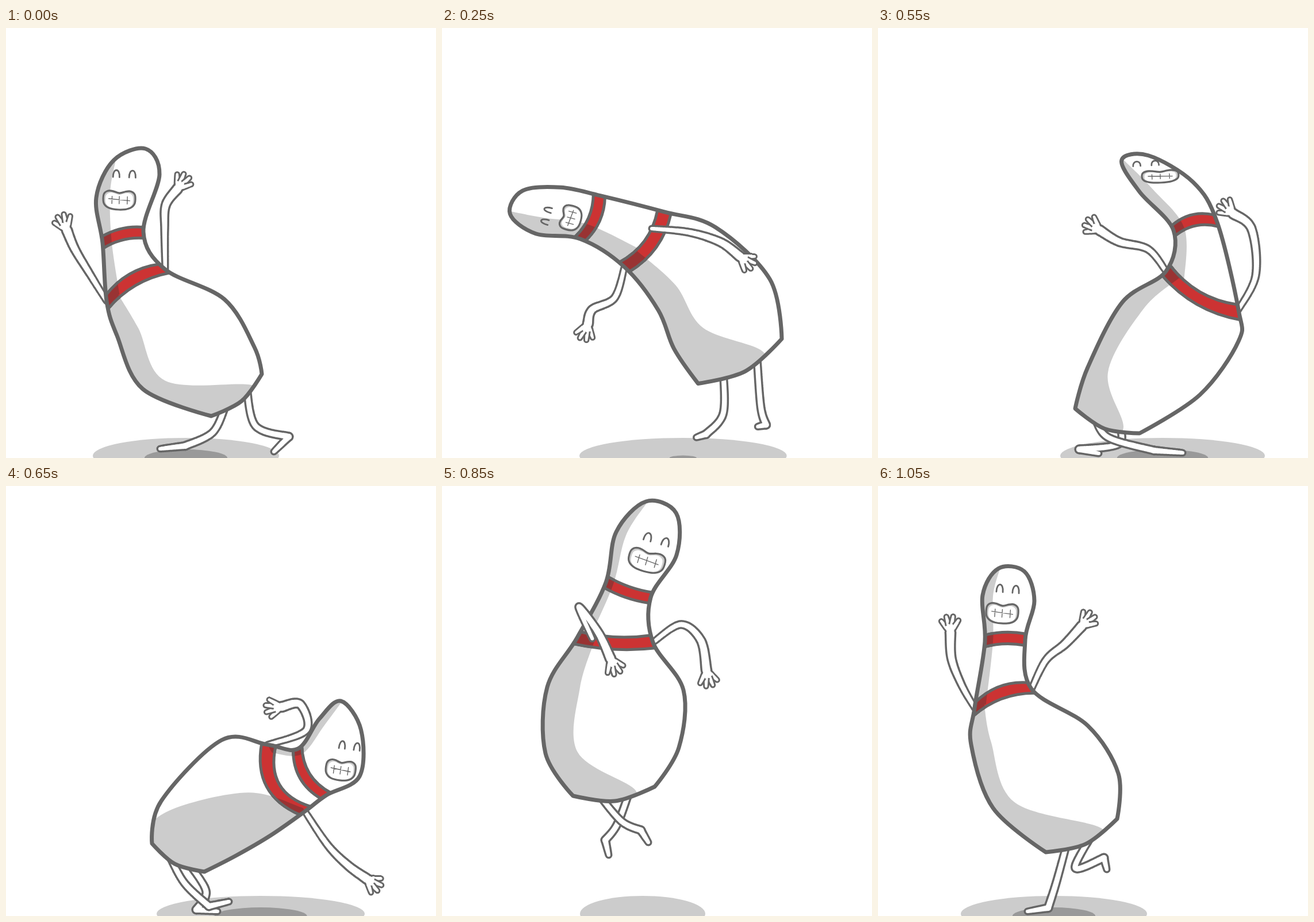
Write an HTML page with a canvas that moves like this. It is 748x748 px and loops after 1.1 s.

```html
<!DOCTYPE html>
<html lang="en">
<head>
<meta charset="utf-8">
<title>Dancing pin</title>
<style>
html, body { margin: 0; width: 100%; height: 100%; overflow: hidden; background: #fff; }
canvas { display: block; }
</style>
</head>
<body>
<canvas id="stage" width="748" height="748"></canvas>
<script>
const ctx = document.getElementById('stage').getContext('2d');
const LOOP = 1100, STEP = 50;
const LINE = '#666', GREY = '#ccc', DARK = '#999', RED = '#cc3333';
const LOW = 3, HIGH = 4; // ribs that carry the red bands

// ribs: left and right edge at base, two belly heights, low band, high band, head
// tip: top of the head; face: mouth and eyes; smile: half width, half height, angle
// bow: bend of the high and low band; dim: shade depth on head and belly, belly shift
// arms: two bends and wrist; legs: knee, ankle, toe
// inset: how far each shoulder sits in front; floor: centre, radius, contact
const poses = [
  { t: 0, ribs: [357,675,445,602, 238,628,432,555, 193,535,380,472, 175,475,277,420, 168,374,239,355, 157,295,267,255],
    tip: [215,220], face: [197,299, 206,253], smile: [28, 17, 0.03], bow: [6, 11], dim: [.22, .2, 0],
    armL: [146,428, 120,385, 106,352], armR: [276,350, 278,308, 298,280], inset: [0, 0],
    legA: [360,703, 312,727, 268,732], legB: [434,692, 492,711, 466,737], floor: [313, 162, 1] },
  { t: 150, ribs: [412,628,533,553, 372,582,505,445, 345,515,400,350, 279,455,321,349, 201,418,219,344, 125,427,150,337],
    tip: [82,381], face: [171,401, 130,401], smile: [20, 17, -1.45], bow: [-4, -12], dim: [.3, .28, 0],
    armL: [268,520, 245,560, 226,588], armR: [298,450, 285,510, 258,542], inset: [0, .3],
    legA: [443,680, 416,728, 385,731], legB: [499,670, 504,722, 477,738], floor: [357, 199, 1] },
  { t: 400, ribs: [446,615,617,590, 405,525,632,510, 386,430,590,420, 394,338,525,323, 370,245,454,212, 330,175,425,148],
    tip: [352,110], face: [401,176, 378,145], smile: [28, 18, -.38], bow: [-8, -8], dim: [.35, .28, 0],
    armL: [358,332, 337,293, 312,312], armR: [516,270, 538,225, 550,190], inset: [0, .15],
    legA: [508,668, 483,700, 492,725], legB: [567,665, 581,677, 584,650], floor: [505, 143, -.5] },
  { t: 550, ribs: [343,662,455,705, 365,590,560,638, 425,477,627,545, 501,423,627,490, 514,352,590,338, 455,285,548,268],
    tip: [447,226], face: [491,258, 466,235], smile: [32, 11, -.05], bow: [10, -14], dim: [.25, .18, 0],
    armL: [470,385, 420,372, 386,352], armR: [657,430, 650,350, 618,323], inset: [0, 0],
    legA: [400,712, 480,735, 530,739], legB: [418,724, 350,733, 384,740], floor: [495, 178, 1] },
  { t: 650, ribs: [254,622,345,671, 270,548,400,643, 375,442,460,608, 455,450,520,566, 508,457,557,538, 545,405,615,505],
    tip: [600,399], face: [582,494, 598,451], smile: [26, 18, .13], bow: [-14, -28], dim: [.12, 1.25, 1.2],
    armL: [522,425, 512,380, 480,384], armR: [560,625, 595,660, 627,683], inset: [0, 0],
    legA: [310,690, 353,731, 388,723], legB: [348,705, 331,737, 368,740], floor: [443, 181, 1] },
  { t: 850, ribs: [228,539,370,523, 180,465,412,455, 183,350,420,355, 235,264,367,272, 285,168,363,194, 303,80,408,120],
    tip: [381,37], face: [356,130, 374,92], smile: [32, 19, .28], bow: [-4, -6], dim: [.16, .24, 0],
    armL: [238,210, 272,255, 293,300], armR: [415,241, 450,268, 460,320], inset: [.2, 0],
    legA: [312,583, 346,599, 359,620], legB: [305,588, 284,616, 290,642], floor: [349, 109, -.5] },
  { t: 1050, ribs: [292,637,416,579, 200,560,418,500, 162,450,365,417, 168,386,267,353, 186,271,256,268, 182,190,272,200],
    tip: [232,146], face: [216,221, 226,178], smile: [28, 18, .07], bow: [4, 11], dim: [.2, .17, 0],
    armL: [145,345, 128,300, 126,255], armR: [292,303, 325,275, 354,244], inset: [0, 0],
    legA: [310,690, 296,734, 260,740], legB: [343,664, 393,647, 398,667], floor: [306, 162, 1] }
];

const N = poses.length;
const mod = j => (j + N) % N;
const span = j => (poses[mod(j + 1)].t - poses[mod(j)].t + LOOP) % LOOP;
const delta = (a, b) => b - a;
const turn = (a, b) => Math.atan2(Math.sin(b - a), Math.cos(b - a));
const mix = (a, b, f) => [a[0] + (b[0] - a[0]) * f, a[1] + (b[1] - a[1]) * f];
const dist = (a, b) => Math.hypot(b[0] - a[0], b[1] - a[1]);
const pairs = a => Array.from({ length: a.length / 2 }, (_, i) => a.slice(2 * i, 2 * i + 2));
const across = (ribs, i, f) => mix(ribs[2 * i], ribs[2 * i + 1], f);

function rotate([x, y], a) {
  const c = Math.cos(a), s = Math.sin(a);
  return [x * c - y * s, x * s + y * c];
}

// Smooth periodic interpolation between pose k and the next one.
function ease(get, k, u, diff = delta) {
  const gap = j => diff(get(mod(j)), get(mod(j + 1)));
  const vel = j => {
    const a = span(j - 1), b = span(j);
    return (gap(j - 1) / a * b + gap(j) / b * a) / (a + b);
  };
  const d = span(k), v = 1 - u;
  return get(mod(k)) + u * v * v * vel(k) * d + u * u * (3 - 2 * u) * gap(k) - u * u * v * vel(k + 1) * d;
}

// A track keeps points relative to a pivot that moves and turns.
function makeTrack(read, pivot, tip) {
  return poses.map(p => {
    const pts = read(p), c = pivot(pts, p), e = pts[tip];
    const angle = Math.atan2(e[1] - c[1], e[0] - c[0]);
    return { c, angle, pts: pts.map(q => rotate([q[0] - c[0], q[1] - c[1]], -angle)) };
  });
}

function sample(track, k, u, at) {
  const angle = ease(j => track[j].angle, k, u, turn);
  const c = at || [0, 1].map(n => ease(j => track[j].c[n], k, u));
  return track[0].pts.map((_, i) => {
    const q = rotate([0, 1].map(n => ease(j => track[j].pts[i][n], k, u)), angle);
    return [q[0] + c[0], q[1] + c[1]];
  });
}

const ROOTS = {
  legB: ribs => across(ribs, 0, .7),
  legA: ribs => across(ribs, 0, .3),
  armL: (ribs, inset) => across(ribs, LOW, inset[0]),
  armR: (ribs, inset) => across(ribs, LOW, 1 - inset[1])
};
const bodyTrack = makeTrack(p => pairs([...p.ribs, ...p.tip, ...p.face]), pts => mix(pts[0], pts[1], .5), 12);
const limbTracks = {};
for (const name in ROOTS) {
  limbTracks[name] = makeTrack(p => pairs(p[name]), (_, p) => ROOTS[name](pairs(p.ribs), p.inset),
    name.startsWith('arm') ? 2 : 1);
}

function curve(path, pts, closed, corners = [], join = false) {
  const n = pts.length;
  const at = i => closed ? pts[(i + n) % n] : pts[Math.max(0, Math.min(n - 1, i))];
  const tan = i => corners.includes((i + n) % n) ? [0, 0]
    : [0, 1].map(k => (at(i + 1)[k] - at(i - 1)[k]) / 6);
  if (join) path.lineTo(...pts[0]); else path.moveTo(...pts[0]);
  for (let i = 0; i < (closed ? n : n - 1); i++) {
    const a = at(i), b = at(i + 1), s = tan(i), e = tan(i + 1);
    path.bezierCurveTo(a[0] + s[0], a[1] + s[1], b[0] - e[0], b[1] - e[1], b[0], b[1]);
  }
  if (closed) path.closePath();
}

// Point on the same smooth curve at position s, counted in points.
function along(pts, s) {
  const i = Math.min(Math.floor(s), pts.length - 2), u = s - i;
  const at = j => pts[Math.max(0, Math.min(pts.length - 1, j))];
  return [0, 1].map(k => {
    const [a, b, c, d] = [at(i - 1)[k], at(i)[k], at(i + 1)[k], at(i + 2)[k]];
    return b + u / 2 * (c - a + u * (2 * a - 5 * b + 4 * c - d + u * (3 * (b - c) + d - a)));
  });
}

function tube(pts, r0, r1, color, grow) {
  ctx.fillStyle = color;
  ctx.beginPath();
  for (let i = 0; i <= 90; i++) {
    const f = i / 90, [x, y] = along(pts, f * (pts.length - 1)), r = r0 + (r1 - r0) * f + grow;
    ctx.moveTo(x + r, y);
    ctx.arc(x, y, r, 0, 7);
  }
  ctx.fill();
}

function drawArm(p) {
  const [x, y] = p[3], aim = Math.atan2(y - p[2][1], x - p[2][0]);
  const finger = (i, f) => {
    const a = aim + (i - 1.5) * .42, len = (30 - 3 * Math.abs(i - 1.5)) * f;
    return [p[3], [x + Math.cos(a) * len, y + Math.sin(a) * len]];
  };
  for (let i = 0; i < 4; i++) {
    tube(finger(i, 1), 4, 2.2, LINE, 3);
    tube(finger(i, 1), 4, 2.2, '#fff', 0);
  }
  tube(p, 3, 7, LINE, 3.5);
  tube(p, 3, 7, '#fff', 0);
  for (let i = 0; i < 4; i++) tube(finger(i, .45), 4, 2.5, '#fff', 0);
}

function drawLeg(p) {
  for (const [color, grow] of [[LINE, 3.5], ['#fff', 0]]) {
    tube(p.slice(0, 3), 4, 5, color, grow);
    tube(p.slice(2), 5, 3, color, grow);
  }
}

function outline(ribs, tip) {
  const brow = mix([0, 0], [ribs[11][0] - ribs[10][0], ribs[11][1] - ribs[10][1]], .25);
  const top = [[tip[0] - brow[0], tip[1] - brow[1]], [tip[0] + brow[0], tip[1] + brow[1]]];
  const all = [...ribs, ...top], [l, r] = ribs;
  const under = [(l[0] + r[0]) / 2 - (r[1] - l[1]) * .12, (l[1] + r[1]) / 2 + (r[0] - l[0]) * .12];
  const left = all.filter((_, i) => i % 2 === 0), right = all.filter((_, i) => i % 2);
  return { all, edge: [...left, ...right.reverse(), under] };
}

// One band edge, half a thickness h above or below its rib.
function bandEdge(edge, rib, h, bow) {
  const point = (i, h) => along(edge, i + h / dist(edge[i], edge[i + Math.sign(h)]));
  const l = point(rib, h), r = point(13 - rib, -h), len = dist(l, r), m = mix(l, r, .5);
  const ctrl = [m[0] + (r[1] - l[1]) / len * 2 * bow, m[1] - (r[0] - l[0]) / len * 2 * bow];
  return { l, r, ctrl };
}

function drawBand(edge, rib, h, bow) {
  const a = bandEdge(edge, rib, h, bow), b = bandEdge(edge, rib, -h, bow);
  ctx.beginPath();
  ctx.moveTo(...a.l);
  ctx.quadraticCurveTo(...a.ctrl, ...a.r);
  ctx.lineTo(...b.r);
  ctx.quadraticCurveTo(...b.ctrl, ...b.l);
  ctx.closePath();
  ctx.fill();
  ctx.stroke();
}

// Shade runs down the inner edge and back up outside the body.
function shadePath(all, [head, belly, shift]) {
  const path = new Path2D();
  const fill = (inner, outer) => {
    curve(path, inner, false);
    curve(path, outer.reverse(), false, [], true);
    path.closePath();
  };
  const headRibs = [6, 5, HIGH, LOW], bellyRibs = [LOW, 2, 1, 0];
  fill(headRibs.map(i => across(all, i, i === 6 ? head * .3 : head)),
    headRibs.map(i => across(all, i, -.25)));
  const below = f => mix(across(all, 1, f), across(all, 0, f), 1.4);
  const depth = i => i ? belly : Math.max(.75, belly);
  const lower = i => -.25 + shift * i / 3;
  fill([...bellyRibs.map(i => across(all, i, depth(i))), below(depth(0))],
    [...bellyRibs.map(i => across(all, i, lower(i))), below(-.25)]);
  return path;
}

function drawBody(ribs, tip, bow, dim) {
  const { all, edge } = outline(ribs, tip), shape = new Path2D();
  curve(shape, edge, true, [0, 13]);
  ctx.fillStyle = '#fff';
  ctx.fill(shape);
  ctx.save();
  ctx.clip(shape);
  ctx.strokeStyle = LINE;
  ctx.lineWidth = 5;
  ctx.fillStyle = RED;
  drawBand(edge, HIGH, 10, bow[0]);
  drawBand(edge, LOW, 12, bow[1]);
  ctx.globalCompositeOperation = 'darken';
  ctx.fillStyle = GREY;
  const dark = shadePath(all, dim);
  ctx.fill(dark);
  // Darker red where the shade crosses a band
  ctx.clip(dark);
  ctx.fillStyle = '#993333';
  ctx.globalCompositeOperation = 'source-over';
  drawBand(edge, HIGH, 10, bow[0]);
  drawBand(edge, LOW, 12, bow[1]);
  ctx.restore();
  ctx.strokeStyle = LINE;
  ctx.lineWidth = 7;
  ctx.stroke(shape);
}

function drawFace(mouth, eyes, [w, h, angle]) {
  const map = (o, u, v) => {
    const q = rotate([u * w, v * h], angle);
    return [o[0] + q[0], o[1] + q[1]];
  };
  const round = x => Math.sign(x) * Math.abs(x) ** .7;
  const lips = (s, dy) => {
    const pts = Array.from({ length: 24 }, (_, i) => {
      const a = i * Math.PI / 12, u = round(Math.cos(a)), v = round(Math.sin(a));
      const dip = v < 0 ? .3 * Math.exp(-6 * u * u) : 0;
      return map(mouth, u * s, (v + dip - .12 * u * u) * s + dy);
    });
    const path = new Path2D();
    curve(path, pts, true);
    return path;
  };
  const line = (o, a, b) => { ctx.moveTo(...map(o, ...a)); ctx.lineTo(...map(o, ...b)); };
  const outer = lips(1, 0);
  ctx.fillStyle = GREY;
  ctx.fill(outer);
  ctx.fillStyle = '#fff';
  ctx.fill(lips(.86, .07));
  ctx.strokeStyle = LINE;
  ctx.lineWidth = 3.2;
  ctx.stroke(outer);
  ctx.lineWidth = 1.4;
  ctx.beginPath();
  line(mouth, [-.66, -.1], [.66, .06]);
  for (const u of [-.45, 0, .5]) line(mouth, [u, -.35], [u, .4]);
  ctx.stroke();
  ctx.lineWidth = 2.8;
  for (const side of [-.5, .5]) {
    const o = map(eyes, side, 0);
    ctx.beginPath();
    ctx.moveTo(...map(o, -.2, .4));
    ctx.bezierCurveTo(...map(o, -.22, -.55), ...map(o, .22, -.55), ...map(o, .2, .4));
    ctx.stroke();
  }
}

function ellipse(x, y, rx, ry, color) {
  ctx.fillStyle = color;
  ctx.beginPath();
  ctx.ellipse(x, y, Math.max(0, rx), Math.max(0, ry), 0, 0, 7);
  ctx.fill();
}

function draw(t) {
  let k = N - 1;
  while (poses[k].t > t) k--;
  const u = (t - poses[k].t) / span(k);
  const value = name => poses[0][name].map((_, i) => ease(j => poses[j][name][i], k, u));
  const pts = sample(bodyTrack, k, u), ribs = pts.slice(0, 12), [tip, mouth, eyes] = pts.slice(12);
  const inset = value('inset'), [x, rx, contact] = value('floor');
  const limb = name => {
    const root = ROOTS[name](ribs, inset);
    return [root, ...sample(limbTracks[name], k, u, root)];
  };
  const arms = ['armL', 'armR'].map(limb);

  ctx.fillStyle = '#fff';
  ctx.fillRect(0, 0, 748, 748);
  ctx.lineCap = ctx.lineJoin = 'round';
  ellipse(x, 744, rx, 31, GREY);
  ellipse(x, 748, rx * .445 * contact, 15 * contact, DARK);
  drawLeg(limb('legB'));
  drawLeg(limb('legA'));
  arms.forEach((arm, i) => inset[i] < .1 && drawArm(arm));
  drawBody(ribs, tip, value('bow'), value('dim'));
  drawFace(mouth, eyes, value('smile'));
  arms.forEach((arm, i) => inset[i] >= .1 && drawArm(arm));
}

const start = performance.now();
function tick() {
  const t = (performance.now() - start) % LOOP;
  draw(Math.floor(t / STEP) * STEP);
  requestAnimationFrame(tick);
}
tick();
</script>
</body>
</html>
```
